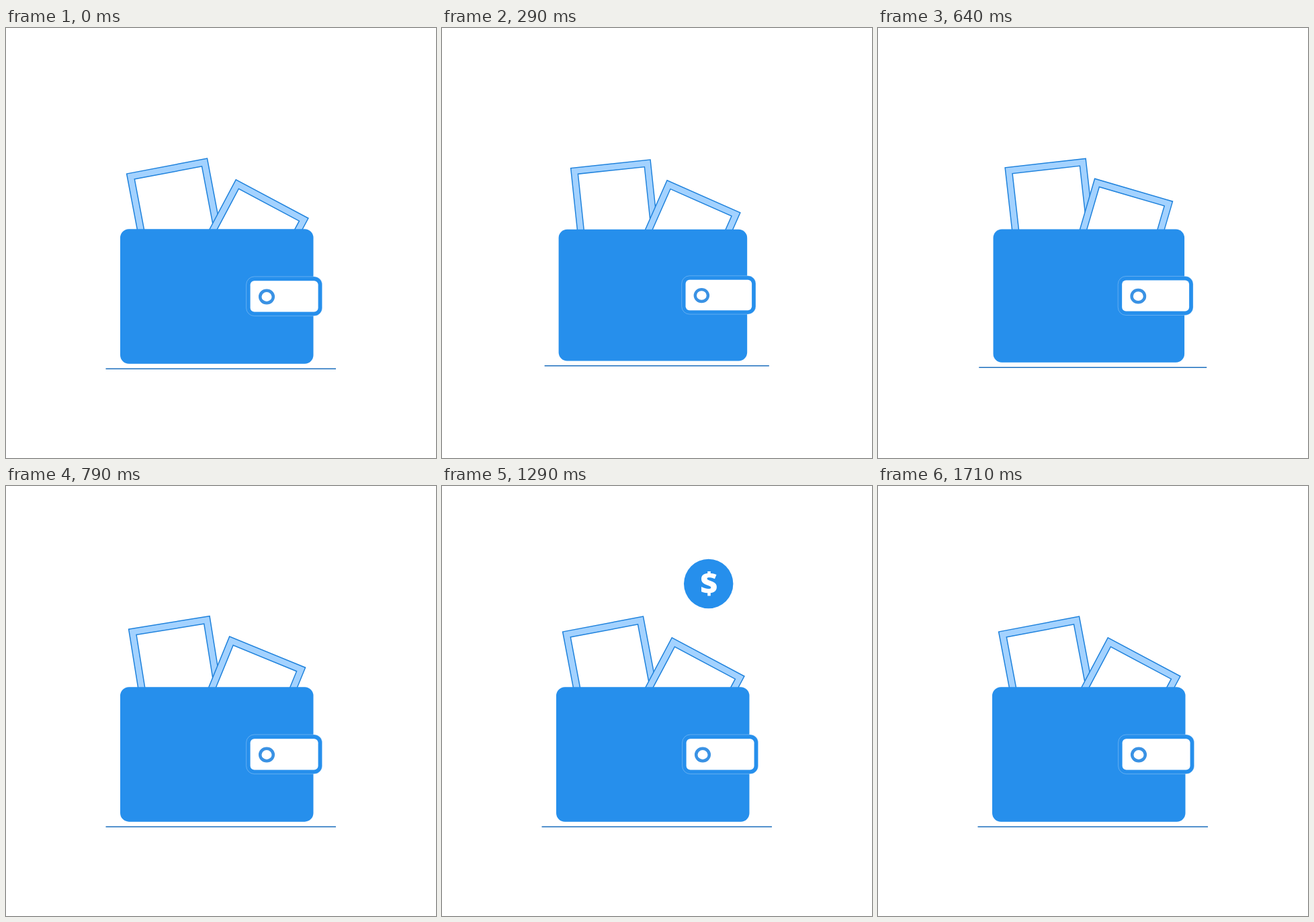
An HTML page for the animation above (2070 ms loop, 640x640 px).

```html
<!DOCTYPE html>
<html lang="en">
<head>
<meta charset="utf-8">
<title>Wallet</title>
<style>
  html, body { margin: 0; width: 100%; height: 100%; overflow: hidden; background: #fff; }
  svg { display: block; width: 100vw; height: 100vh; }
  .band { fill: #a3d2ff; }
  .card rect { stroke: #1f82dc; stroke-width: 1.5; }
  .hole { fill: #fff; }
  .blue { fill: #268fec; }
  text { font: 800 44.7px "Open Sans", "Noto Sans", sans-serif; fill: #fff; text-anchor: middle; }
</style>
</head>
<body>
<svg viewBox="0 0 640 640">
  <defs>
    <g id="card" class="card">
      <rect class="band" width="122" height="130"/>
      <rect class="hole" x="10" y="10" width="102" height="110"/>
    </g>
  </defs>
  <g id="scene">
    <g id="left"><use href="#card" transform="translate(179.6 217) rotate(-10.76)"/></g>
    <g id="right"><use href="#card" transform="translate(342.2 225.8) rotate(28)"/></g>
    <g id="coin">
      <circle class="blue" r="36.7"/>
      <text x=".7" y="15.2">$</text>
    </g>
    <rect class="blue" x="170" y="299.2" width="287.5" height="200.5" rx="13"/>
    <rect class="blue" x="357.6" y="370" width="113" height="58.6" rx="12"
          stroke="#fff" stroke-opacity=".4" stroke-width=".7"/>
    <rect class="hole" x="363.6" y="376.2" width="101" height="46.4" rx="6"/>
    <ellipse cx="388" cy="400" rx="9.8" ry="9.2" fill="#fff" stroke="#3a92e4" stroke-width="4.5"/>
    <path d="M148.5 507.2H491" stroke="#1c6fbd" stroke-width="1.6"/>
  </g>
</svg>
<script>
  const LOOP = 2070, FPS = 14, FRAMES = 29;
  const REST_Y = 145.5, DROP = 194.5;
  const part = id => document.getElementById(id);
  const scene = part("scene"), left = part("left"), right = part("right"), coin = part("coin");

  const span = (t, a, b) => Math.min(1, Math.max(0, (t - a) / (b - a)));
  const smooth = u => u * u * (3 - 2 * u);
  // Rises from 0 to 1 at the peak, then returns to 0
  const swing = (t, start, peak, end) =>
    smooth(t < peak ? span(t, start, peak) : 1 - span(t, peak, end));

  // Frame starts fall on whole hundredths of a second
  function frameTime(t) {
    let k = FRAMES - 1;
    while (Math.round(k * 100 / FPS) * 10 > t) k--;
    return k * 1000 / FPS;
  }

  function draw(t) {
    const scale = 1 - 0.03 * swing(t, 0, 400, 800);
    scene.setAttribute("transform", `translate(320 320) scale(${scale}) translate(-320 -320)`);
    left.setAttribute("transform", `rotate(${6.6 * swing(t, 0, 443, 950)} 320 320)`);
    right.setAttribute("transform", `rotate(${-14.6 * swing(t, 170, 500, 1000)} 320 320)`);

    const rest = 1 - span(t, 785.7, 1285.7);
    const fall = span(t, 1357.1, 1714.2);
    const y = REST_Y + DROP * (rest ** 2.84 + fall ** 2);
    const flip = Math.cos(2 * Math.PI * rest ** 2.1);
    coin.setAttribute("transform", `translate(396.7 ${y}) scale(${flip} 1)`);
  }

  const begin = performance.now();
  function tick() {
    draw(frameTime((performance.now() - begin) % LOOP));
    requestAnimationFrame(tick);
  }
  tick();
</script>
</body>
</html>
```
